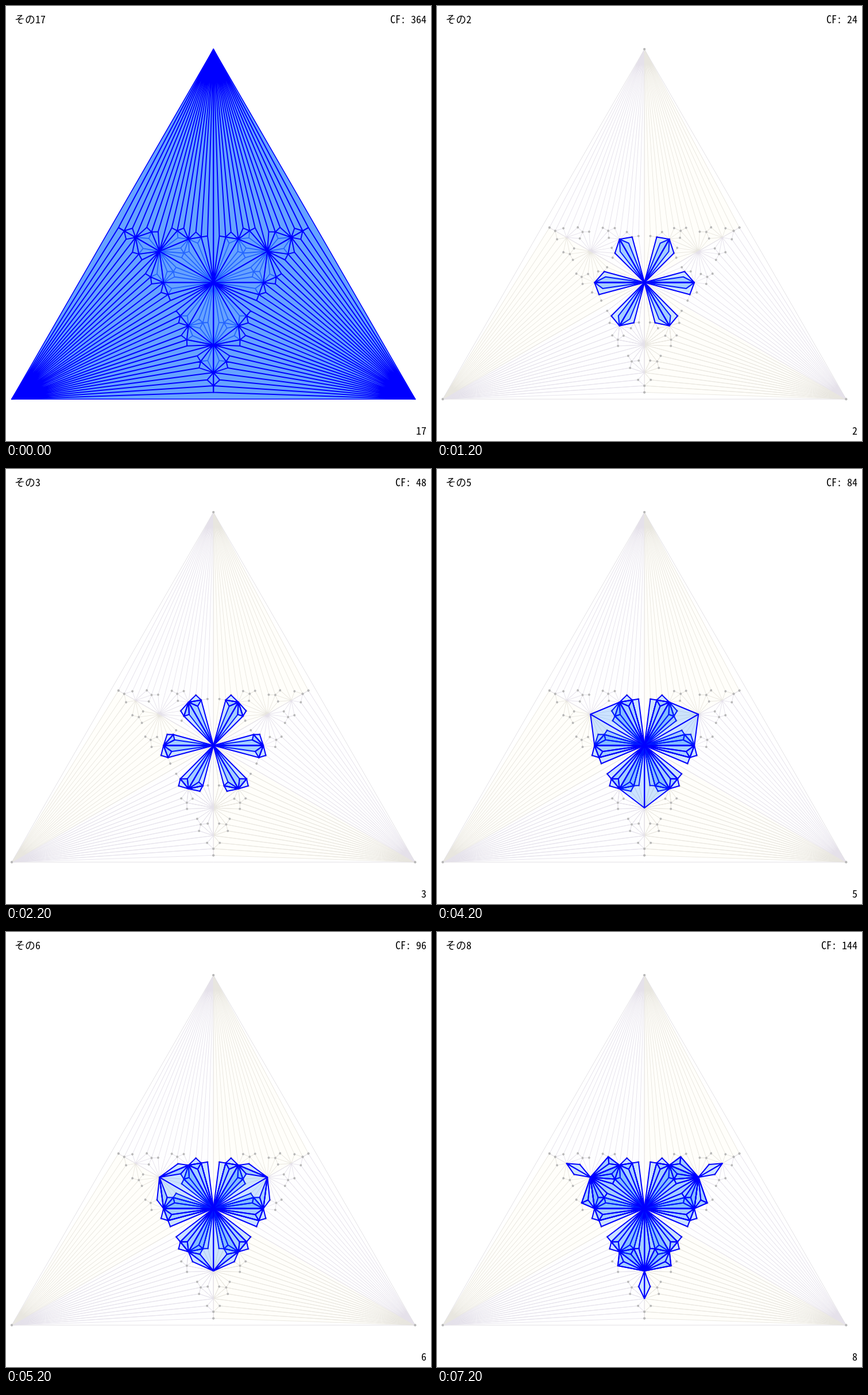
Write an HTML page with a canvas that moves like this. It is 740 px wide and 756 px high and loops after 8 s.

```html
<!DOCTYPE html>
<html lang="ja">
<head>
<meta charset="utf-8">
<style>
  html, body { margin: 0; width: 740px; height: 756px; overflow: hidden; background: #fff; }
  canvas, svg { position: absolute; left: 0; top: 0; }
  text { font: 18px "Noto Sans Mono CJK JP", "Noto Sans CJK JP", monospace; }
</style>
</head>
<body>
<canvas width="740" height="756"></canvas>
<svg width="740" height="756">
  <text id="title" x="15" y="29.5"></text>
  <text id="count" x="732" y="29.5" text-anchor="end"></text>
  <text id="page" x="732" y="744.5" text-anchor="end"></text>
</svg>
<script>
const ctx = document.querySelector('canvas').getContext('2d');
const [title, count, page] = ['title', 'count', 'page'].map(id => document.getElementById(id));

// One sixth of the figure, relative to its centre; the rest follows by symmetry.
const points = {
  C: [0, 0], P: [43.5, 75.2], A: [45.4, 57.8], B: [25.4, 63.5], D: [57.7, 58], E: [18.5, 70],
  F: [60.6, 70.3], U: [23.6, 79.4], T: [64.8, 49.3], Q: [9.6, 69.5], H: [0, 108.5], J: [36.3, 92.4],
  L: [46.3, 99.5], K: [56, 92], M: [46, 110.3], N: [28.3, 127.5], S: [10, 135.7], Y: [22.2, 137.2],
  Z: [25, 148.4], G: [0, 156.6], R: [11, 169.3], X: [0, 179.4], W: [0, 190.9], V: [351.2, 202.7]
};
const steps = [
  'CPA CPB', 'CPD CPE', 'PDF PEU PAD PBE', 'CDT CEQ CAD CBE',
  'CHP', 'HPJ HPU', 'HPL HPE HEQ HUE CHQ', 'PJL HJL HGS'
].map(s => s.split(' '));
const outer = ('PLK HLM HNY HYS SYG YZG HGY GRX VCT VTD VDF VFP VPK VKL VLM VMH ' +
  'VHN VNY VYZ VZG VGR VRX VXW').split(' ');
const faces = [...steps.flat(), ...outer];
const totals = [12, 24, 48, 72, 84, 96, 120, 144];

function shape(names) {
  const path = new Path2D();
  for (const name of names) {
    [...name].forEach((p, i) => path[i ? 'lineTo' : 'moveTo'](...points[p]));
    path.closePath();
  }
  return path;
}

const hidden = /[ABEUQJS]/;
const allFaces = shape(faces);
const backFaces = shape(faces.filter(f => !/[AB]/.test(f)));
const innerFaces = shape(faces.filter(f => hidden.test(f)));
const mainFaces = shape(faces.filter(f => !hidden.test(f)));
const sector = shape(['VCHW']);
const stepFaces = steps.map(list => list.map(f => shape([f])));
const frame = new Path2D('M0-405.4L351.2 202.7H-351.2Z');

function sixfold(draw) {
  for (let k = 0; k < 6; k++) {
    ctx.save();
    ctx.rotate((k >> 1) * Math.PI * 2 / 3);
    if (k & 1) ctx.scale(-1, 1);
    draw(k & 1);
    ctx.restore();
  }
}

function stroke(path, color, width) {
  ctx.strokeStyle = color;
  ctx.lineWidth = width;
  ctx.stroke(path);
}

function drawBackground() {
  sixfold(odd => {
    // Neighbouring sectors alternate between lavender and beige.
    const beige = !odd === false ? false : true;
    ctx.fillStyle = beige ? '#fffefa' : '#fefeff';
    ctx.fill(sector);
  });
  sixfold(odd => stroke(backFaces, odd ? '#e5e1ea' : '#e8e6df', 0.9));
  stroke(frame, '#e2e0e4', 1);
  ctx.fillStyle = '#b8b8b8';
  sixfold(() => {
    for (const name in points) {
      if ('ABCPHG'.includes(name)) continue;
      ctx.beginPath();
      ctx.arc(...points[name], 2, 0, 7);
      ctx.fill();
    }
  });
}

function drawStep(step) {
  drawBackground();
  ctx.fillStyle = 'rgba(0,120,255,.2)';
  for (const path of stepFaces.slice(0, step).flat()) {
    sixfold(() => {
      ctx.fill(path);
      stroke(path, '#00f', 2);
    });
  }
}

function drawWhole() {
  ctx.fillStyle = '#66a3ff';
  ctx.fill(frame);
  sixfold(() => stroke(innerFaces, '#2464ff', 1.8));
  sixfold(() => stroke(mainFaces, '#00f', 2));
  stroke(frame, '#00f', 1.6);
}

let shown;
function tick(now) {
  const t = now % 8000;
  const step = t < 200 ? 17 : Math.floor((t - 200) / 1000) + 1;
  if (step !== shown) {
    shown = step;
    ctx.setTransform(1, 0, 0, 1, 0, 0);
    ctx.clearRect(0, 0, 740, 756);
    ctx.translate(361.2, 480.5);
    ctx.lineJoin = 'round';
    if (step === 17) drawWhole(); else drawStep(step);
    title.textContent = 'その' + step;
    count.textContent = 'CF: ' + (totals[step - 1] || 364);
    page.textContent = step;
  }
  requestAnimationFrame(tick);
}
tick(performance.now());
</script>
</body>
</html>
```
